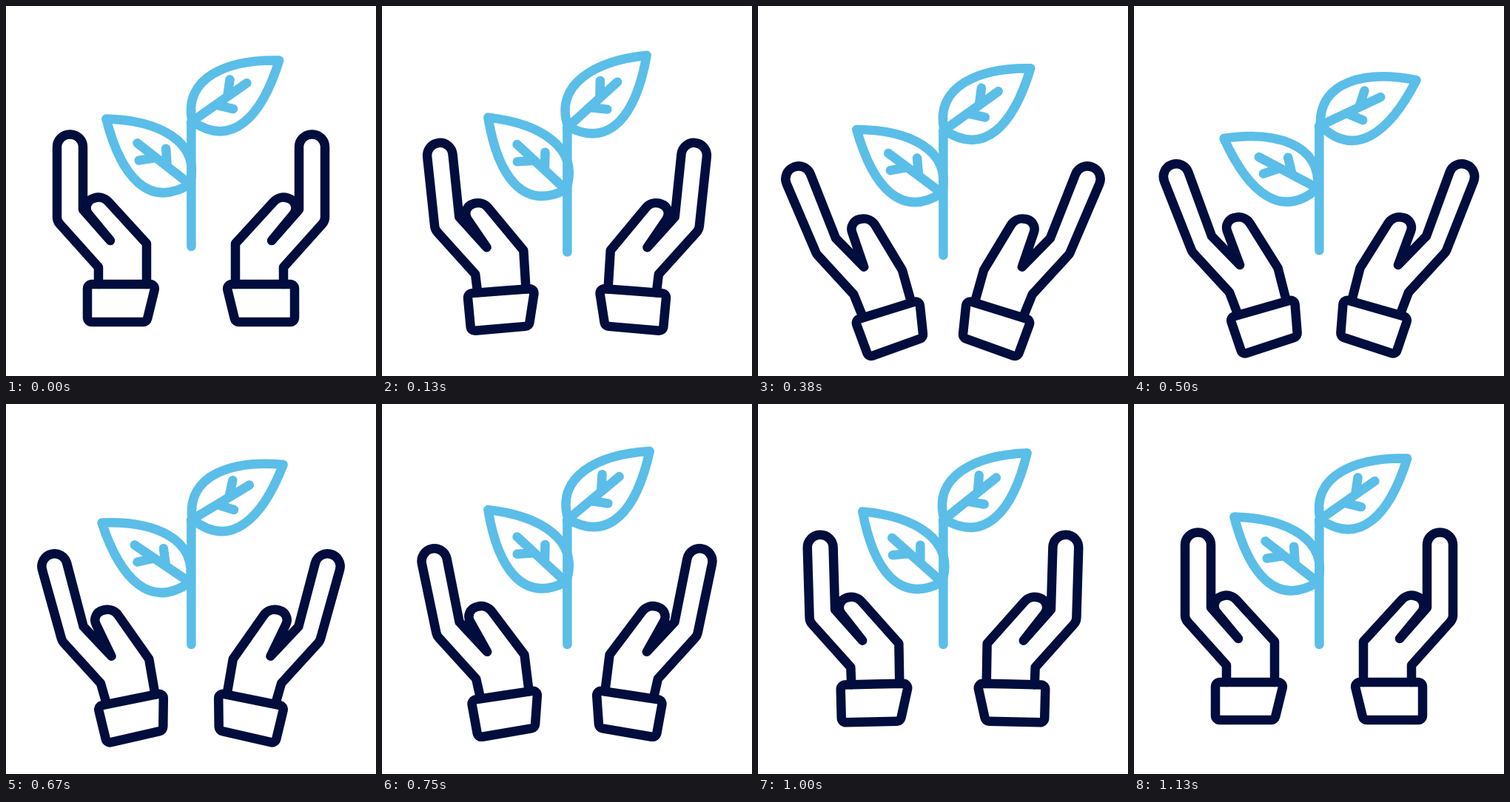
Write an HTML page with a canvas that moves like this. It is 500 px wide and 500 px high and loops after 1.18 s.

```html
<!DOCTYPE html>
<html lang="en">
<head>
<meta charset="utf-8">
<title>Growing plant between hands</title>
<style>
  html, body { margin: 0; width: 100%; height: 100%; overflow: hidden; background: #fff; }
  canvas { display: block; width: 100vw; height: 100vh; }
</style>
</head>
<body>
<canvas id="stage" width="500" height="500"></canvas>
<script>
const ctx = document.getElementById('stage').getContext('2d');
const NAVY = '#000d3d', SKY = '#5bbee8';
const LOOP = 1180, STEP = 1000 / 24, LAST = 27;

// A joint moves from its closed to its open place; r rounds the corner
const joint = (x, y, openX, openY, r = 0) => ({
  at: q => [x + (openX - x) * q, y + (openY - y) * q], r
});

const hand = [
  joint(125, 376, 140, 416),            // wrist
  joint(125, 353, 129, 387),            // heel
  joint(69, 290.5, 78.5, 332, 14),      // bend
  joint(69, 173.5, 34.5, 220.5, 17.2),  // fingertip
  joint(104, 173.5, 67.5, 208.5, 17.2),
  joint(104, 275, 105, 311),            // finger base
  joint(141, 317, 143, 350),            // notch
  joint(99, 266, 120.5, 289.5, 13.5),   // thumb tip
  joint(130.5, 256, 150, 283, 18),
  joint(190, 321, 194.5, 354),          // thumb base
  joint(190, 376, 206, 399)
];
const cuff = [
  joint(110, 376, 129.5, 421, 6), joint(202.5, 376, 217, 396, 6),
  joint(190, 427, 221, 446.5, 6), joint(110, 427, 146.5, 471, 6)
];

// A leaf grows from the origin along the x axis
const blade = new Path2D('M2 0C26 -56 90 -41 145.5 0C82 49 25 61 2 0Z');
const veins = new Path2D('M0 0H92M60 0L76 -17M41 0L57 18');

// Tracks: [time in steps, value], eased between keys
const spread = [[0, 0], [9, 1.08], [27, 0]];
const sink = [[0, 0], [6, 15.2], [16, 0]];
const sway = rise => [[0, 0], [5, rise], [13.3, -11.2], [20, 9.2], [27, 0]];
const leftSway = sway(7.5), rightSway = sway(11.2);

const smooth = u => u * u * (3 - 2 * u);

function valueAt(keys, k) {
  const i = keys.findIndex(([t]) => t > k);
  if (i < 0) return keys[keys.length - 1][1];
  const [t0, a] = keys[i - 1], [t1, b] = keys[i];
  return a + (b - a) * smooth((k - t0) / (t1 - t0));
}

function drawLine(joints, q) {
  const points = joints.map(j => j.at(q)), end = points.length - 1;
  ctx.beginPath();
  ctx.moveTo(...points[0]);
  for (let i = 1; i < end; i++) {
    ctx.arcTo(...points[i], ...points[i + 1], joints[i].r);
  }
  ctx.lineTo(...points[end]);
  ctx.stroke();
}

function drawLoop(joints, q) {
  const points = joints.map(j => j.at(q)), n = points.length;
  const [a, b] = points;
  ctx.beginPath();
  ctx.moveTo((a[0] + b[0]) / 2, (a[1] + b[1]) / 2);
  for (let i = 1; i <= n; i++) {
    ctx.arcTo(...points[i % n], ...points[(i + 1) % n], joints[i % n].r);
  }
  ctx.closePath();
  ctx.stroke();
}

function drawHand(q, side) {
  ctx.save();
  ctx.translate(250, 0);
  ctx.scale(side, 1);
  ctx.translate(-250, 0);
  drawLine(hand, q);
  drawLoop(cuff, q);
  ctx.restore();
}

function drawLeaf(y, degrees, side) {
  ctx.save();
  ctx.translate(250, y);
  ctx.scale(side, 1);
  ctx.rotate(-degrees * Math.PI / 180);
  ctx.stroke(blade);
  ctx.scale(1, side);
  ctx.stroke(veins);
  ctx.restore();
}

function draw(k) {
  ctx.fillStyle = '#fff';
  ctx.fillRect(0, 0, 500, 500);
  ctx.lineWidth = 12.5;
  ctx.lineCap = ctx.lineJoin = 'round';

  ctx.strokeStyle = NAVY;
  const q = valueAt(spread, k);
  drawHand(q, 1);
  drawHand(q, -1);

  ctx.strokeStyle = SKY;
  ctx.save();
  ctx.translate(0, valueAt(sink, k));
  ctx.beginPath();
  ctx.moveTo(250.4, 325);
  ctx.lineTo(250.4, 158);
  ctx.stroke();
  drawLeaf(242, 38 + valueAt(leftSway, k), -1);
  drawLeaf(157, 35 + valueAt(rightSway, k), 1);
  ctx.restore();
}

function tick() {
  const t = performance.now() % LOOP;
  draw(Math.min(LAST, Math.floor((t + 5) / STEP)));
  requestAnimationFrame(tick);
}
tick();
</script>
</body>
</html>
```
